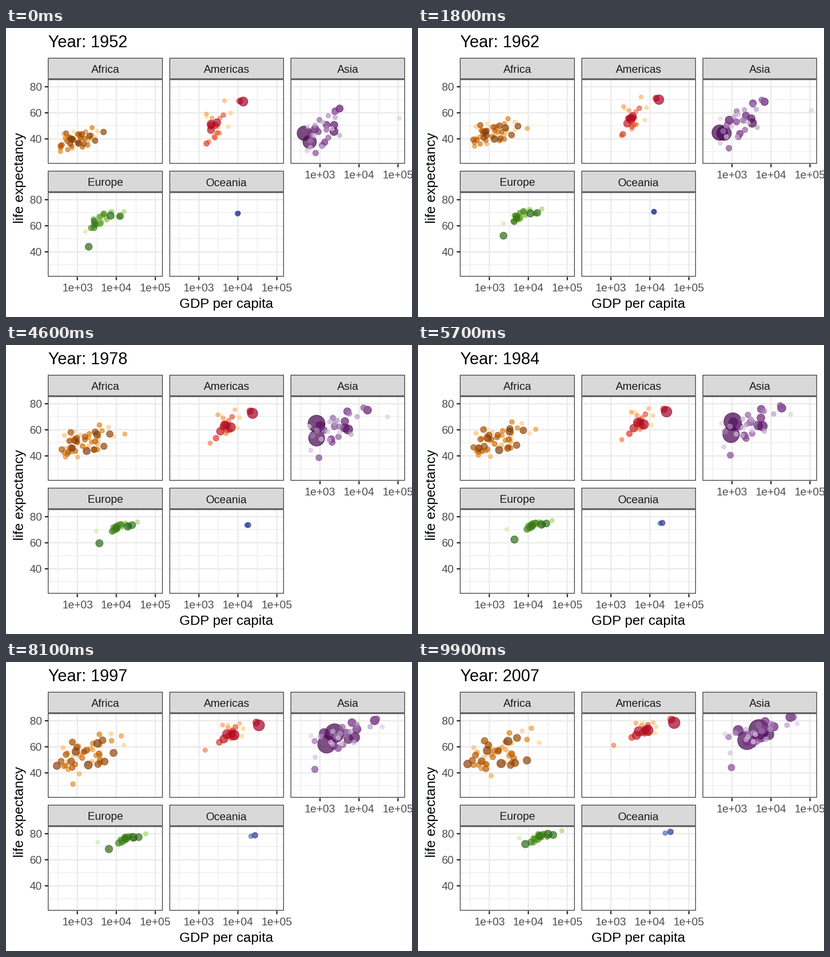
Recreate the animation shown at these times as a matplotlib script. Size 885 px wide and 632 px high, loop 10000 ms.

```python
import numpy as np
import matplotlib.pyplot as plt
from matplotlib.animation import FuncAnimation
from matplotlib.colors import to_rgb
from matplotlib.patches import Rectangle

W, H, DPI = 885, 632, 100
PT = 72 / DPI
FRAMES, STEP = 100, 9
YEARS = np.arange(1952, 2008, 5)
T = (YEARS - 1952) / 55

PANEL_W, PANEL_H, STRIP_H = 249.8, 184.7, 46.8
LEFT, TOP, DX, DY = 91.5, 112, 264.4, 247
X_MIN, X_MAX = 2.2487, 5.1887
Y_MIN, Y_MAX = 20.649, 85.553
DARK = "#333333"

plt.rcParams["font.family"] = "Liberation Sans"
rng = np.random.default_rng(11)

# cloud: mean and spread of log income, mean and spread of life expectancy,
#        each at the start, middle and end of the period
# link:  correlation of income and life expectancy
# size:  largest dot, decay over ranks, share of it at the start
# head:  dots far larger than the rest
# leads: rank -> (year, income, life) stops of the dots that stand out
PANELS = [
    dict(name="Africa", col=0, row=0, n=52, link=0.4, size=(10.5, 20, 0.52),
         cloud=[(2.96, 3.14, 3.18), (0.28, 0.36, 0.42), (39, 51, 55), (4.5, 6.5, 8.5)],
         colors=("#7F3B08", "#B35806", "#E08214", "#FDB863", "#FEE0B6"),
         leads={0: [(1952, 1077, 36.3), (1972, 1698, 42.8), (2007, 2014, 46.9)],
                3: [(1952, 781, 39), (1972, 905, 46), (2002, 241, 45), (2007, 278, 46.5)],
                4: [(1952, 4725, 45), (1987, 7826, 60.8), (2007, 9270, 49.3)],
                28: [(1952, 493, 40), (1987, 848, 44), (1992, 737, 23.6), (2007, 863, 46.2)],
                32: [(1952, 2388, 42.7), (1967, 18773, 50.2), (2007, 12057, 74)]}),
    dict(name="Americas", col=1, row=0, n=25, link=0.5, size=(17.3, 6, 0.7),
         cloud=[(3.47, 3.75, 3.88), (0.19, 0.19, 0.22), (53, 66, 73.5), (8.5, 5.5, 3.2)],
         colors=("#A50026", "#D73027", "#F46D43", "#FDAE61", "#FEE090"),
         leads={0: [(1952, 13990, 68.4), (1972, 21806, 71.3), (2007, 42952, 78.2)],
                1: [(1952, 2109, 50.9), (1977, 6660, 61.5), (2007, 9066, 72.4)],
                5: [(1952, 11367, 68.8), (1972, 18971, 72.9), (2007, 36319, 80.7)],
                14: [(1952, 1840, 37.6), (1982, 2011, 51.5), (2007, 1202, 60.9)]}),
    dict(name="Asia", col=2, row=0, n=33, link=0.65, size=(15, 12, 0.66),
         head=(36.3, 33.3),
         cloud=[(3.15, 3.5, 3.75), (0.35, 0.47, 0.5), (46, 62, 70.5), (9, 8, 6.5)],
         colors=("#40004B", "#762A83", "#9970AB", "#C2A5CF", "#E7D4E8"),
         leads={0: [(1952, 400, 44), (1962, 488, 44.5), (1972, 677, 63.1),
                    (1982, 962, 65.5), (1992, 1656, 68.7), (2007, 4959, 73)],
                1: [(1952, 547, 37.4), (1972, 724, 50.7), (1992, 1164, 60.2),
                    (2007, 2452, 64.7)],
                5: [(1952, 3217, 63), (1972, 14779, 73.4), (2007, 31656, 82.6)],
                12: [(1952, 779, 28.8), (1982, 978, 39.9), (1992, 649, 41.7),
                     (2007, 975, 43.8)],
                31: [(1952, 108382, 55.6), (1972, 109348, 67.7), (1982, 31354, 71.3),
                     (2007, 47307, 77.6)]}),
    dict(name="Europe", col=0, row=1, n=30, link=0.8, size=(9.5, 11, 0.85),
         cloud=[(3.7, 4.15, 4.35), (0.25, 0.17, 0.19), (65.5, 73, 78), (4, 2, 2.5)],
         colors=("#276419", "#4D9221", "#7FBC41", "#B8E186", "#E6F5D0"),
         leads={0: [(1952, 7144, 67.5), (1972, 18016, 71), (2007, 32170, 79.4)],
                1: [(1952, 1969, 43.6), (1962, 2323, 52.1), (1992, 5678, 66.1),
                    (2007, 8458, 71.8)],
                26: [(1952, 1601, 55.2), (1972, 3313, 67.7), (1992, 2497, 71.6),
                     (2007, 5937, 76.4)]}),
    dict(name="Oceania", col=1, row=1, n=2, link=0, size=(4.5, 1.2, 0.67),
         cloud=np.zeros((4, 3)), colors=("#313695", "#4575B4"),
         leads={0: [(1952, 10040, 69.1), (1972, 16789, 71.9), (2007, 34435, 81.2)],
                1: [(1952, 10557, 69.4), (1972, 16046, 71.9), (2007, 25185, 80.2)]}),
]


def wander(a, b, angle=0.6):
    """Turn slowly from one random position towards another."""
    return a[:, None] * np.cos(angle * T) + b[:, None] * np.sin(angle * T)


def courses(n, cloud, link, leads):
    """Log income and life expectancy per dot for every survey year."""
    coef = np.polyfit([0, 0.5, 1], np.transpose(cloud), 2)
    mx, sx, my, sy = (np.vander(T, 3) @ coef).T
    u = wander(*np.clip((rng.gamma(4, 1, (2, n)) - 4) / 2, -1.4, 2))
    v = wander(*np.clip(rng.normal(size=(2, n)), -1.6, 1.6))
    x = mx + sx * u
    y = my + sy * (link * u + np.sqrt(1 - link ** 2) * v)
    cap = 74 + 10 * T
    y = cap - 2 * np.log1p(np.exp((cap - y) / 2))
    for k, stops in leads.items():
        year, income, life = np.transpose(stops)
        x[k] = np.interp(YEARS, year, np.log10(income))
        y[k] = np.interp(YEARS, year, life)
    return x, y


def diameters(n, size, head):
    """Dot area follows population, which thins out with rank."""
    top, decay, start = size
    root = top * np.exp(-(np.arange(n) - len(head)) / decay)
    root[:len(head)] = head
    return 9.5 + 0.98 * root[:, None] * (start + (1 - start) * T)


def ramp(names, n):
    c = np.array([to_rgb(s) for s in names])
    t = np.linspace(0, len(c) - 1, n)
    rgb = [np.interp(t, range(len(c)), c[:, k]) for k in range(3)]
    return np.column_stack(rgb + [np.full(n, 0.7)])


fig = plt.figure(figsize=(W / DPI, H / DPI), dpi=DPI, facecolor="white")
ax = fig.add_axes([0, 0, 1, 1])
ax.set(xlim=(0, W), ylim=(H, 0))
ax.axis("off")


def text(x, y, s, size, color="black", ha="center", **kw):
    return ax.text(x, y, s, fontsize=size * PT, color=color, ha=ha,
                   va="baseline", **kw)


def line(x, y, color, width, z):
    ax.plot(x, y, color=color, lw=width * PT, solid_capstyle="butt", zorder=z)


def box(x, y, w, h, z, fill="none"):
    i = 0.75
    ax.add_patch(Rectangle((x + i, y + i), w - 2 * i, h - 2 * i, fc=fill,
                           ec=DARK, lw=1.5 * PT, joinstyle="miter", zorder=z))


def px(v, left):
    return left + (v - X_MIN) / (X_MAX - X_MIN) * PANEL_W


def py(v, top):
    return top + (Y_MAX - v) / (Y_MAX - Y_MIN) * PANEL_H


def draw_panel(name, col, row):
    left, top = LEFT + DX * col, TOP + DY * row
    right, bottom = left + PANEL_W, top + PANEL_H
    for ticks_x, ticks_y, width, z in (((2.5, 3.5, 4.5), (30, 50, 70), 1.45, 1),
                                       ((3, 4, 5), (40, 60, 80), 2.9, 2)):
        for v in ticks_y:
            line([left, right], [py(v, top)] * 2, "#EBEBEB", width, z)
        for v in ticks_x:
            line([px(v, left)] * 2, [top, bottom], "#EBEBEB", width, z)
    box(left, top, PANEL_W, PANEL_H, 5)
    box(left, top - STRIP_H, PANEL_W, STRIP_H, 5, "#D9D9D9")
    text(left + PANEL_W / 2, top - 13.5, name, 24, "#1A1A1A", zorder=6)
    if col == 0:
        for v in (40, 60, 80):
            y = py(v, top)
            line([left - 7.5, left], [y, y], DARK, 2.9, 4)
            text(left - 13, y + 9, str(v), 24, "#4D4D4D", "right")
    if row == 1 or col == 2:
        for v in (3, 4, 5):
            x = px(v, left)
            line([x, x], [bottom, bottom + 7.5], DARK, 2.9, 4)
            text(x, bottom + 32, f"1e+0{v}", 24, "#4D4D4D")
    return left, top


def add_dots(left, top, n, cloud, link, leads, size, colors, head=()):
    x, y = courses(n, cloud, link, leads)
    # Large dots lie on top, except the giants, which would hide the others.
    order = np.arange(n) if head else np.arange(n)[::-1]
    x, y = px(x, left)[order], py(y, top)[order]
    dots = ax.scatter(x[:, 0], y[:, 0], c=ramp(colors, n)[order],
                      linewidths=1.2 * PT, zorder=3)
    dots.set_clip_path(Rectangle((left, top), PANEL_W, PANEL_H,
                                 transform=ax.transData))
    return dots, x, y, diameters(n, size, head)[order]


clouds = []
for p in PANELS:
    corner = draw_panel(p.pop("name"), p.pop("col"), p.pop("row"))
    clouds.append(add_dots(*corner, **p))

title = text(LEFT + 0.5, 42, "", 36, ha="left")
text(480.5, 611.5, "GDP per capita", 30)
text(38, 328, "life expectancy", 30, rotation=90, rotation_mode="anchor")


def update(i):
    k, f = divmod(i, STEP)
    nxt, f = min(k + 1, len(YEARS) - 1), f / STEP
    for dots, *tracks in clouds:
        x, y, d = (a[:, k] * (1 - f) + a[:, nxt] * f for a in tracks)
        dots.set_offsets(np.column_stack([x, y]))
        dots.set_sizes(((d - 1.2) * PT) ** 2)
    title.set_text(f"Year: {round(1952 + 55 * i / (FRAMES - 1))}")
    return [c[0] for c in clouds] + [title]


anim = FuncAnimation(fig, update, frames=FRAMES, interval=100, repeat=True,
                     repeat_delay=0, blit=False)
plt.show()
```
